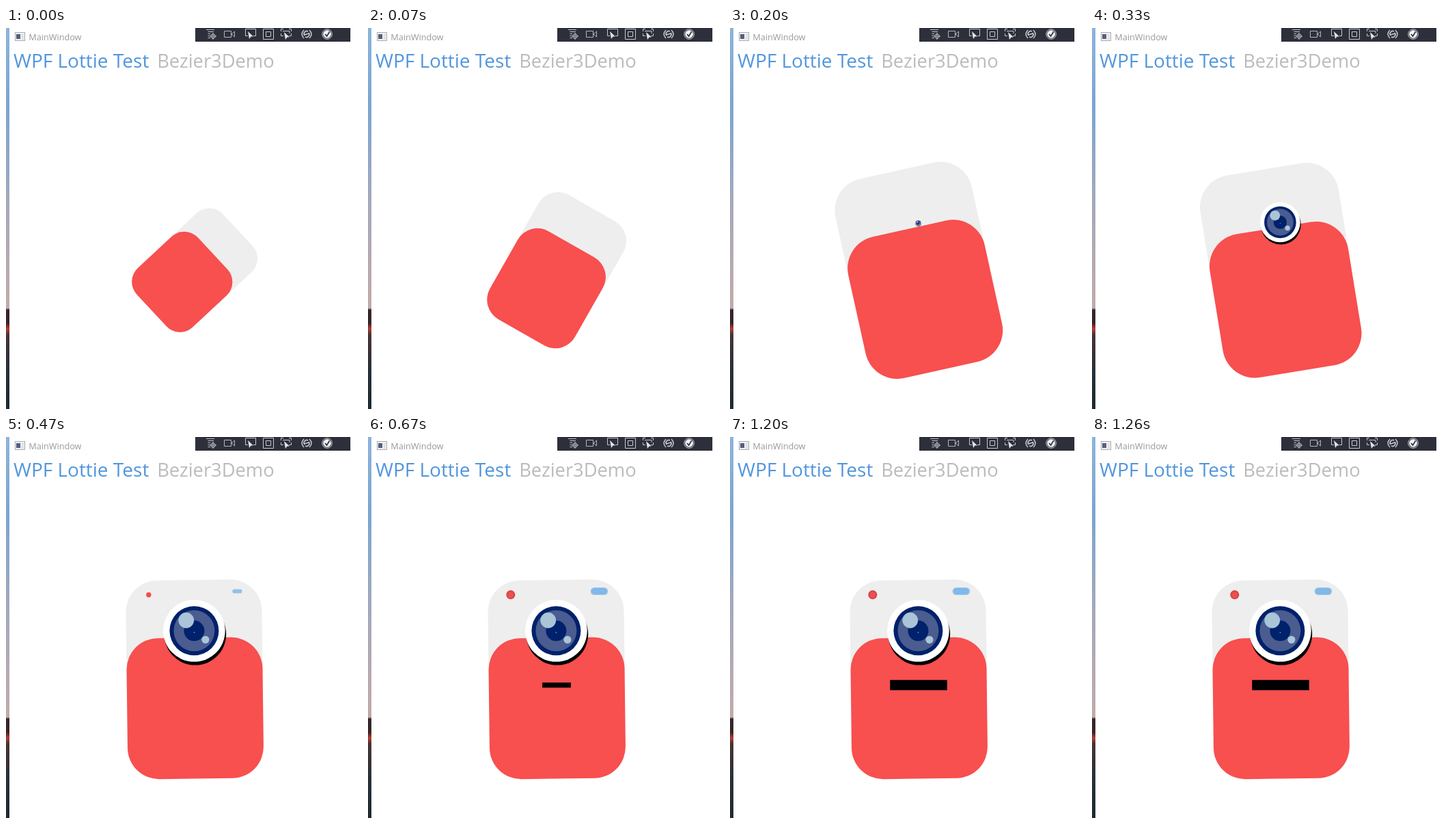
Recreate the animation shown at these times as an HTML page. Size 521x557 px, loop 1330 ms.

```html
<!DOCTYPE html>
<html lang="en">
<head>
<meta charset="utf-8">
<title>MainWindow</title>
<style>
  html, body { margin: 0; width: 100%; height: 100%; overflow: hidden; background: #fff; }
  svg { display: block; width: 100vw; height: 100vh; }
  text { font-family: "Open Sans", "Noto Sans", sans-serif; }
</style>
</head>
<body>
<svg viewBox="0 0 521 557">
  <defs>
    <linearGradient id="desktop" x1="0" y1="0" x2="0" y2="1">
      <stop offset="0" stop-color="#8db4dc"/>
      <stop offset=".2" stop-color="#7ba6d2"/>
      <stop offset=".45" stop-color="#a3a9bd"/>
      <stop offset=".735" stop-color="#c4aaa8"/>
      <stop offset=".74" stop-color="#33282c"/>
      <stop offset=".775" stop-color="#3a2528"/>
      <stop offset=".79" stop-color="#b83a34"/>
      <stop offset=".805" stop-color="#4a3434"/>
      <stop offset=".9" stop-color="#26323a"/>
      <stop offset="1" stop-color="#202a30"/>
    </linearGradient>
    <path id="pointer" d="M0 0 8 7.5H4.5L2 11Z" fill="#e4e4e6" stroke="none"/>
  </defs>

  <rect width="5" height="557" fill="url(#desktop)"/>

  <!-- Title bar -->
  <rect x="13.5" y="6.5" width="14" height="12" fill="#f1f1f3" stroke="#aaa9b0"/>
  <rect x="15" y="9" width="6" height="7" fill="#55607e"/>
  <path d="M22.5 10H26M22.5 13H26M22.5 16H26" stroke="#c4c6ce"/>
  <text x="33.2" y="18" font-size="12.7" fill="#999">MainWindow</text>
  <text x="11" y="58" font-size="28" fill="#5196dc">WPF Lottie Test</text>
  <text x="221.2" y="58" font-size="27.3" fill="#bbb">Bezier3Demo</text>

  <!-- Debug toolbar -->
  <rect x="277" width="227" height="20" fill="#2d303b"/>
  <g fill="none" stroke="#c6c8ce">
    <path d="M293 2.5H305M295.5 5.5H304M295.5 8.5H299M295.5 11.5H298M295.5 14.5H299"/>
    <circle cx="303" cy="12" r="3.2"/>
    <path d="M303 7V17M298 12H308"/>
    <path d="M319.5 4.5H329.5V13.5H319.5ZM330 9 334.5 5V13Z" stroke="#b4b6bd"/>
    <path d="M354 11.5H350.5V1.5H365.5V11.5H362"/>
    <use href="#pointer" x="354" y="5"/>
    <path d="M376.5 1.5H391.5V16.5H376.5ZM380.5 5.5H387.5V12.5H380.5Z"/>
    <path d="M402.5 5V1.5H406M414 1.5H417.5V5M417.5 8V11.5H414M406 11.5H402.5V8M405 4.5H415V8"/>
    <use href="#pointer" x="407" y="6"/>
    <path d="M436 3Q430 9 436 15M444 3Q450 9 444 15" stroke-width="1.5"/>
    <path d="M442 5A4 4 0 0 0 437 11M438 13A4 4 0 0 0 443 7M437 10 443 8" stroke-width="1.7"/>
    <circle cx="470" cy="9" r="7.3"/>
    <circle cx="470" cy="9" r="5.6" fill="#f4f4f4"/>
    <path d="M467 9 469.5 12 473.5 5.5" stroke="#2d303b" stroke-width="1.7"/>
  </g>

  <!-- Camera -->
  <g id="body">
    <rect x="-99.5" y="-145" width="199" height="206" rx="46" fill="#eee"/>
    <rect x="-99.5" y="-60.5" width="199" height="206" rx="46" fill="#f84f4f"/>
  </g>
  <g id="lens">
    <circle cx="1.5" cy="5" r="45.3"/>
    <circle r="45.3" fill="#fff"/>
    <circle r="36" fill="#00216b"/>
    <circle r="30" fill="#4a5c90"/>
    <circle r="15" fill="#00216b"/>
    <circle cx="-11.7" cy="-15.3" r="11.4" fill="#aac4d8"/>
    <circle cx="16.5" cy="13" r="5.6" fill="#aac4d8"/>
    <circle cy="2.5" r=".8" fill="#aac4d8"/>
  </g>
  <g id="lamp">
    <circle r="6.6" fill="#ee4f50"/>
    <circle class="rim" r="5.2" fill="none" stroke="#b94549" stroke-width="1.4" stroke-dasharray="2 1"/>
  </g>
  <g id="flash">
    <rect x="-12.7" y="-5.5" width="25.4" height="11" rx="5.5" fill="#92c1e9"/>
    <rect class="rim" x="-10" y="-3.2" width="20" height="6.4" rx="3.2" fill="#82b9ea" stroke="#74b2e8"/>
  </g>
  <rect id="slot" x="-41.75" y="-7.5" width="83.5" height="15"/>
</svg>

<script>
  const LOOP = 1330;
  const STEP = 1000 / 15; // the picture is held for one step at a time
  const LEAD = 4;         // ms, absorbs rounding of the step times
  const SWING_PEAK = 3.6; // step at which the body has swung furthest

  const rims = document.querySelectorAll(".rim");

  // Smooth 0 to 1 progress between two steps
  function ease(step, from, to) {
    const u = Math.min(1, Math.max(0, (step - from) / (to - from)));
    return u * u * (3 - 2 * u);
  }

  function place(id, x, y, scale, angle = 0) {
    document.getElementById(id).setAttribute("transform",
      `translate(${x} ${y}) rotate(${angle}) scale(${scale})`);
  }

  function draw(now) {
    const step = Math.floor((now % LOOP + LEAD) / STEP);

    // The body swings past its rest pose, then settles
    const swing = ease(step, -.5, SWING_PEAK);
    const settle = ease(step, SWING_PEAK, 6.6);
    const pose = (start, peak, rest) => start + (peak - start) * swing + (rest - peak) * settle;
    place("body", 276.2, 354, pose(.573, 1.055, 1), pose(49.7, -16.3, -.7));

    const lens = ease(step, 2, 7);
    const lights = ease(step, 5, 8.7);
    place("lens", 275.4, 283.3 + 2 * (1 - lens), lens);
    place("lamp", 208.8, 230.7, lights);
    place("flash", 338.4, 225.5, lights);
    place("slot", 276, 362.7, ease(step, 8, 12));
    for (const rim of rims) rim.setAttribute("opacity", lights < 1 ? 0 : 1);
  }

  const origin = performance.now();
  function tick() {
    draw(performance.now() - origin);
    requestAnimationFrame(tick);
  }
  tick();
</script>
</body>
</html>
```
